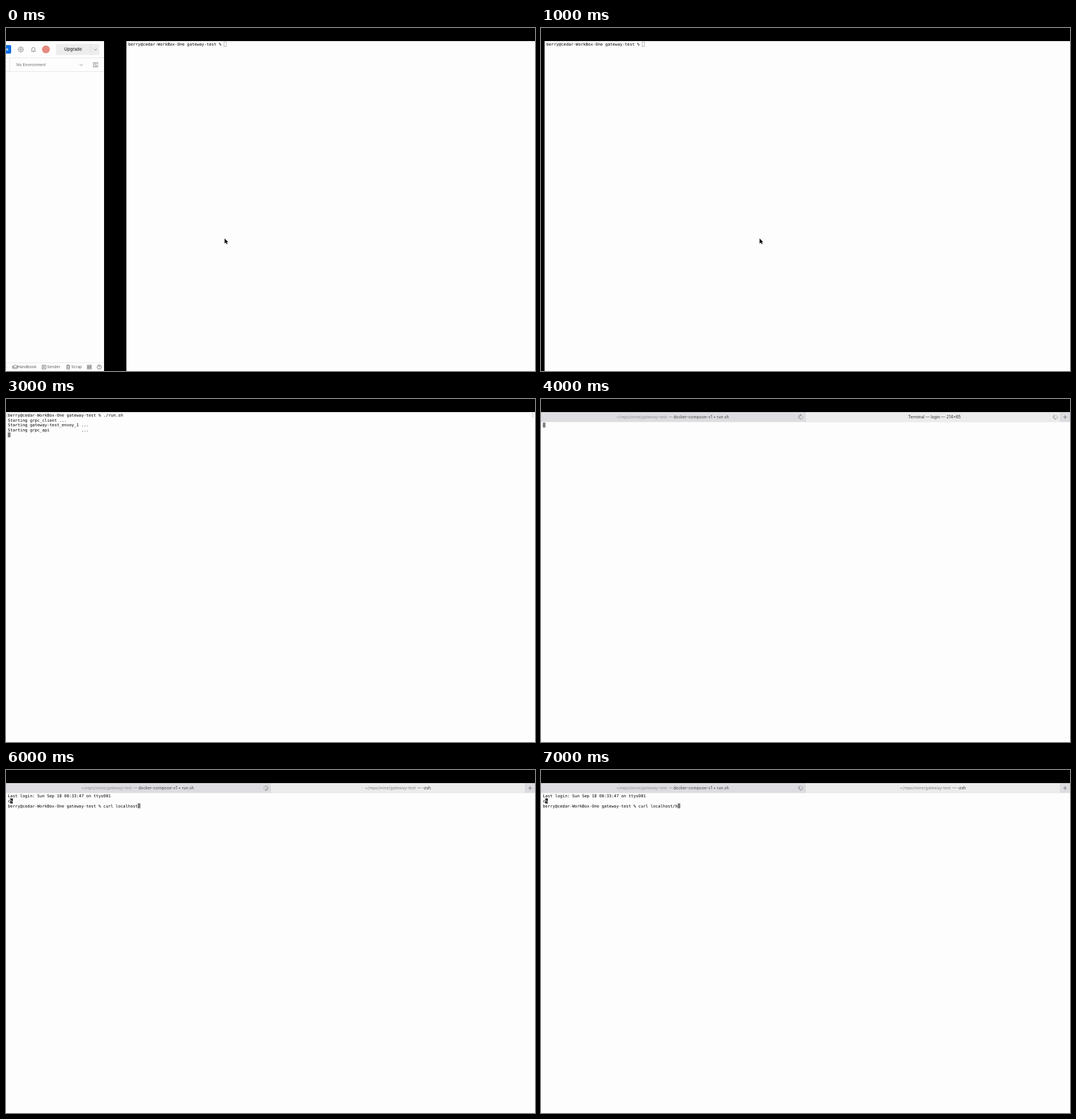
Write an HTML page with a canvas that moves like this. It is 928 by 603 pixels and loops after 8 s.

```html
<!DOCTYPE html>
<html lang="en">
<head>
<meta charset="utf-8">
<title>Gateway test</title>
<style>
  html, body { margin: 0; width: 100%; height: 100%; overflow: hidden; background: #000; }
  canvas { display: block; }
</style>
</head>
<body>
<canvas id="stage" width="928" height="603"></canvas>
<script>
const ctx = document.getElementById('stage').getContext('2d');
const PAPER = '#fdfdfd';
const CELL = 4.3, ROW = 8.6, INSET = 3.2;
const MONO = '7.15px "DejaVu Sans Mono", monospace';
const PROMPT = 'berry@cedar-WorkBox-One gateway-test % ';
const STARTUP = [
  'Starting grpc_client ...',
  'Starting gateway-test_envoy_1 ...',
  'Starting grpc_api             ...'
];

function box(x, y, w, h, color) {
  ctx.fillStyle = color;
  ctx.fillRect(x, y, w, h);
}

function rounded(x, y, w, h, r, color) {
  ctx.fillStyle = color;
  ctx.beginPath();
  ctx.roundRect(x, y, w, h, r);
  ctx.fill();
}

function disc(x, y, r, color) {
  ctx.fillStyle = color;
  ctx.beginPath();
  ctx.arc(x, y, r, 0, Math.PI * 2);
  ctx.fill();
}

function label(text, x, y, color, size, weight = 400) {
  ctx.font = `${weight} ${size}px Inter, sans-serif`;
  ctx.fillStyle = color;
  ctx.fillText(text, x, y);
}

function outline(path, color = '#6b6b6b', width = 0.8) {
  ctx.strokeStyle = color;
  ctx.lineWidth = width;
  ctx.stroke(new Path2D(path));
}

// Terminal text, addressed by row and column
function line(text, row, left = 0, col = 0, color = '#000') {
  ctx.font = MONO;
  ctx.fillStyle = color;
  ctx.fillText(text, left + INSET + col * CELL, 31.2 + row * ROW);
}

function cursor(col, row) {
  box(INSET + col * CELL, 24.3 + row * ROW, CELL + 0.3, ROW, '#7f7f7f');
}

function idlePrompt(left) {
  box(left, 23, 928 - left, 580, PAPER);
  line(PROMPT, 0, left);
  ctx.strokeStyle = '#a2a2a2';
  ctx.lineWidth = 0.8;
  ctx.strokeRect(left + INSET + PROMPT.length * CELL + 0.2, 24.7, 4, 7.9);
}

function pointer(x, y) {
  const shape = new Path2D(`M${x} ${y}v9l2.1-1.9 1.5 3 1.4-.7-1.4-2.9h2.7z`);
  ctx.strokeStyle = '#fff';
  ctx.lineWidth = 1;
  ctx.stroke(shape);
  ctx.fillStyle = '#000';
  ctx.fill(shape);
}

function gear(x, y) {
  ctx.beginPath();
  for (let i = 0; i <= 48; i++) {
    const a = i / 48 * Math.PI * 2;
    const r = 4.2 + 0.6 * Math.tanh(3 * Math.cos(8 * a));
    ctx.lineTo(x + r * Math.cos(a), y + r * Math.sin(a));
  }
  ctx.moveTo(x + 1.6, y);
  ctx.arc(x, y, 1.6, 0, Math.PI * 2);
  ctx.strokeStyle = '#6b6b6b';
  ctx.lineWidth = 0.8;
  ctx.stroke();
}

function sidePanel() {
  box(0, 23, 172, 580, PAPER);

  rounded(-8, 30, 17, 15, 2, '#0b6fe8');
  label('e', 0, 40.3, '#fff', 7.2, 600);
  gear(26, 37.7);
  outline('M44.2 40.8h7.6l-1-1.4v-2.5a2.8 2.8 0 0 0-5.6 0v2.5zM47 41.4q1 1.6 2 0');
  disc(70, 37.6, 6.9, '#e58b7f');

  rounded(87.5, 28, 76.5, 19.5, 2, '#ededed');
  box(148, 28, 0.8, 19.5, '#d9d9d9');
  label('Upgrade', 102, 40.4, '#4a4a4a', 7.5, 600);
  outline('M154.4 36.6l2.5 2.5 2.5-2.5');

  box(0, 52, 172, 0.8, '#e3e3e3');
  box(6, 52, 0.8, 24.5, '#e3e3e3');
  box(0, 76, 172, 0.8, '#e3e3e3');
  label('No Environment', 18.3, 67.4, '#6b6b6b', 6.8);
  outline('M129.3 63.7l2.5 2.5 2.5-2.5');
  outline('M157 68.5h-3.7v-7.6h7.7v3.2M155 63h4M155 65.2h2M156.5 67.2q2.6-3.2 5.2 0q-2.6 3.2-5.2 0zM158.6 67.2h1');

  box(0, 588, 172, 0.8, '#e3e3e3');
  const gray = '#5c5c5c';
  const footer = (text, x) => label(text, x, 598.4, gray, 6.8);
  footer('s', -2.8);
  outline('M11.3 594.8l5-2.3 5 2.3-5 2.3zM13.2 596v2.4q3.1 1.7 6.2 0v-2.4M11.6 595v4', gray);
  footer('Handbook', 20.3);
  outline('M63.4 592.8h6.6v6.6h-6.6zM65.7 594.4v3.4l2.5-1.7z', gray);
  footer('Sender', 72);
  outline('M105.7 593.8h6.7M107.7 593.6v-1.3h2.7v1.3M106.5 594l.4 5.8h4.3l.4-5.8M108.1 595.5v2.8M110 595.5v2.8', gray);
  footer('Scrap', 114.5);
  outline('M142.7 592.6h2.7v2.6h-2.7zM147 592.6h2.7v2.6H147zM142.7 597h2.7v2.6h-2.7zM147 597h2.7v2.6H147zM142.2 596.1h8', gray);
  outline('M167.2 596a3.7 3.7 0 1 0-7.4 0a3.7 3.7 0 1 0 7.4 0M162.3 595q.1-1.2 1.2-1.2 1.2 0 1.2 1.1 0 .6-1.2 1.4v.4M163.5 597.5v.8', gray);
}

function spinner(x, y, phase) {
  ctx.lineWidth = 1;
  for (let i = 0; i < 8; i++) {
    const a = (phase - i) * Math.PI / 4;
    ctx.strokeStyle = `rgba(50,50,50,${1 - i * 0.11})`;
    ctx.beginPath();
    ctx.moveTo(x + 2.2 * Math.cos(a), y + 2.2 * Math.sin(a));
    ctx.lineTo(x + 4.7 * Math.cos(a), y + 4.7 * Math.sin(a));
    ctx.stroke();
  }
}

function tabBar(phase) {
  const faded = '#929296', size = 7.2, base = 34.2;
  box(0, 23, 928, 17.5, '#dddde1');
  box(464, 23, 447, 17.5, '#ececec');
  box(463.5, 23, 0.7, 17.5, '#cdcdd0');
  box(910.8, 23, 0.7, 17.5, '#c9c9cc');
  outline('M916 31.8h6.8M919.4 28.4v6.8', '#707073', 0.9);

  label('~/repo/mine/gateway-test', 132.2, base, faded, size);
  label('—', 223.8, base, '#77777a', size);
  label('docker-compose-v1 • run.sh', 232.2, base, '#48484a', size);
  spinner(455.8, 31.7, phase);
}

function terminal() {
  box(0, 23, 928, 580, PAPER);
}

function runScript(started) {
  terminal();
  outline('M2.6 25.2H1.6v6.6h1M923.2 25.2h1v6.6h-1', '#a8a8a8', 0.7);
  const command = PROMPT + './run.sh ';
  line(command, 0);
  if (started) STARTUP.forEach((text, i) => line(text, i + 1));
  cursor(started ? 0 : command.length, started ? 4 : 0);
}

function loginTab() {
  terminal();
  tabBar(6);
  label('Terminal — login — 214×65', 644, 34.2, '#303030', 7.1);
  spinner(902.6, 31.7, 5);
  cursor(0, 2);
}

function shellTab(command, phase) {
  terminal();
  tabBar(phase);
  label('~/repo/mine/gateway-test', 629.8, 34.2, '#858585', 7.2);
  label('—', 721.2, 34.2, '#606060', 7.2);
  label('-zsh', 730, 34.2, '#303030', 7.2);

  line('Last login: Sun Sep 18 00:33:47 on ttys001', 2);
  line('c', 3);
  box(INSET + CELL, 50.1, CELL, ROW, '#000');
  line('%', 3, 0, 1, '#fff');
  line(PROMPT + command, 4);
  cursor(PROMPT.length + command.length, 4);
}

// One scene per second
const scenes = [
  () => { sidePanel(); idlePrompt(211.2); pointer(383.5, 370); },
  () => { idlePrompt(6.3); pointer(383.5, 370); },
  () => runScript(false),
  () => runScript(true),
  loginTab,
  () => shellTab('curl l', 0),
  () => shellTab('curl localhost', 2),
  () => shellTab('curl localhost/h', 5)
];

function draw(now) {
  box(0, 0, 928, 603, '#000');
  scenes[Math.floor(now / 1000) % scenes.length]();
  requestAnimationFrame(draw);
}
requestAnimationFrame(draw);
</script>
</body>
</html>
```
